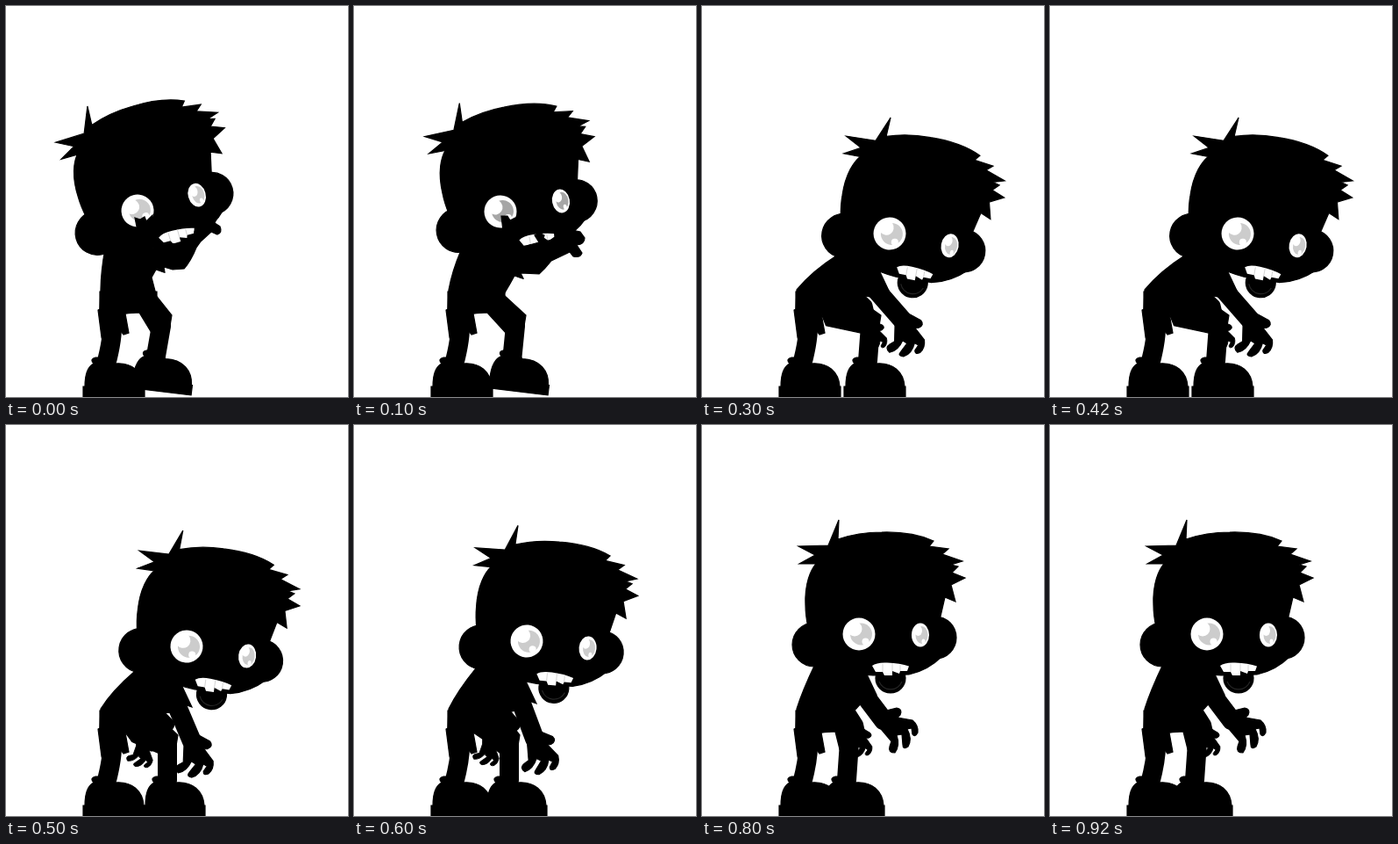
These frames come from a looping animation (390 px wide and 445 px high, 1000 ms). An HTML page:

```html
<!DOCTYPE html>
<html lang="en">
<head>
<meta charset="utf-8">
<title>Shuffling zombie</title>
<style>
  html, body { margin: 0; width: 100%; height: 100%; overflow: hidden; background: #fff; }
  svg { display: block; width: 390px; height: 445px; stroke: #000; stroke-width: 1.2; }
  .limb { fill: none; stroke-linecap: round; stroke-linejoin: round; }
</style>
</head>
<body>
<svg viewBox="0 0 390 445">
  <defs>
    <path id="shoe" d="M0 11.500V0H2C2-16 6-23 12-26Q7-31 14-33H30L36-26C56-28 68-16 69 0H70V11.500Z"/>
    <path id="hand" d="M-8-8L3-11L15-14Q22-13 19-6L16-3L33 0Q40 6 39 14Q36 20 33 16L32 9L27 10Q33 21 28 30Q22 34 22 28L21 16L15 17Q19 29 13 37Q5 37 7 30L9 24L-3 10Z"/>
  </defs>

  <path id="backArm" class="limb" stroke-width="16"/>
  <use id="backHand" href="#hand"/>

  <path d="M107 325V345L105 346L109 377L114 369L131 370L134 374L140 372L136 350L172 345V325Z"/>
  <path class="limb" stroke-width="22" stroke-linecap="butt" d="M121 360Q122 378 114 408"/>
  <use href="#shoe" x="88" y="433"/>
  <path id="shin" class="limb" stroke-width="22"/>
  <path id="thigh"/>
  <use id="foot" href="#shoe"/>
  <path id="torso"/>

  <path id="frontArm" class="limb" stroke-width="22"/>
  <use id="frontHand" href="#hand"/>

  <g id="head">
    <circle cx="128" cy="250" r="25"/>
    <circle cx="266" cy="242" r="24"/>
    <circle cx="215" cy="288" r="17"/>
    <path d="M202 292A14 14 0 0 0 228 292" fill="none" stroke="#262626"/>
    <path d="M118 205C117 180 124 165 130 158L111 158L129 148L110 138L144 137L156 108L155 130Q178 122 205 122Q240 121 264 132L259 138L281 141L274 147L297 155L284 159L292 161L285 168L300 174L284 182L289 201L277 196L271 222L274 263Q258 279 236 284L195 285Q152 282 130 262Q118 228 118 205Z"/>
    <g stroke="none" fill="#fff">
      <path d="M194 274Q199 270 211 270.500Q226 271 236 274.500L234 280L226 280L225 283L217 280V285L208 285L206 281L198 281Z"/>
      <path d="M206 272V281M217 271V280M226 273V280" stroke="#ccc" stroke-width=".8"/>
      <circle cx="179" cy="238" r="18.500"/>
      <circle class="iris" cx="181.500" cy="238" r="12.500"/>
      <circle cx="174" cy="232" r="8.500"/>
      <circle cx="186.500" cy="246.500" r="4"/>
      <ellipse cx="249" cy="239" rx="10" ry="13.500"/>
      <ellipse class="iris" cx="250.500" cy="239" rx="7" ry="10"/>
      <ellipse cx="246.500" cy="234" rx="4.500" ry="6"/>
      <ellipse cx="252.500" cy="246.500" rx="2" ry="3"/>
    </g>
  </g>
  <path id="reach"/>
</svg>
<script>
const $ = id => document.getElementById(id);
const irises = document.querySelectorAll('.iris');

// Arms held up in front of the face
const reachHigh = 'M160 280L172 299L181 303L180 297L190 300L203 299Q211 290 217 275L222 268L234 257L241 260Q247 258 244 251L238 247L243 235L225 240L215 257L213 266L198 271L180 270Z' +
  'M147 241L153 243L158 240L160 245L167 238L168 256L150 256Z';
const reachLow = 'M165 280L176 304L193 310L190 304L211 305Q218 299 225 290L246 280L250 285Q258 287 260 281L254 272Q263 271 263 264L258 257L249 255L257 247L228 250L229 263L222 268L216 264L217 261L211 258L206 261L211 269L200 272L192 276Z' +
  'M168 239L175 239L178 244L184 241V256H170Z';

// head: eye x, y, tilt; neck, sleeve, knee: x, y; foot: x, y, tilt; hands: x, y, tilt
const poses = [
  { at: 0, head: [150, 233, -15.6], neck: [113, 276], sleeve: [180, 303], knee: [177, 368], foot: [143, 423, 7], reach: reachHigh },
  { at: 100, head: [167, 234, -10.7], neck: [122, 278], sleeve: [192, 310], knee: [184, 368], foot: [153, 423, 7], reach: reachLow, iris: '#a6a6a6' },
  { at: 300, head: [214, 259, 10.5], neck: [155, 283], sleeve: [214, 326], knee: [192, 368], foot: [162, 433, 0], front: [229, 358, 42], back: [192, 365, 35] },
  { at: 500, head: [206, 252, 8.2], neck: [146, 281], sleeve: [212, 321], knee: [184, 369], foot: [157, 433, 0], front: [212, 360, 43], back: [156, 362, 60] },
  { at: 600, head: [197, 246, 5.7], neck: [139, 277], sleeve: [208, 317], knee: [177, 369], foot: [150, 433, 0], front: [206, 357, 36], back: [154, 360, 60] },
  { at: 700, head: [188, 241, 3.2], neck: [134, 274], sleeve: [203, 312], knee: [172, 368], foot: [144, 433, 0], front: [210, 348, 26], back: [164, 358, 60] },
  { at: 800, head: [179, 238, 0], neck: [129, 272], sleeve: [199, 307], knee: [168, 365], foot: [138, 433, 0], front: [207, 336, 0], back: [178, 350, 45] }
];

const path = (id, d) => $(id).setAttribute('d', d);
const show = (id, on) => $(id).style.display = on ? '' : 'none';

function place(id, [x, y, turn], scale = 1) {
  $(id).setAttribute('transform', `translate(${x} ${y}) rotate(${turn}) scale(${scale})`);
}

function pose(p) {
  const [nx, ny] = p.neck, [sx, sy] = p.sleeve, [kx, ky] = p.knee;
  const [ex, ey, tilt] = p.head;
  const lean = Math.max(tilt, 0);
  $('head').setAttribute('transform', `translate(${ex - 179} ${ey - 238}) rotate(${tilt} 179 238)`);
  irises.forEach(e => e.setAttribute('fill', p.iris || '#ccc'));

  path('torso', `M107 345L108 323Q${nx * .4 + 63} 302 ${nx} ${ny}L${nx + 15} ${ny - 18}L${sx - 18} ${sy - 38}L${sx} ${sy}L${sx - 9} ${sy - 3}L${sx - 14} ${sy + 6}L171 328L173 345Z`);
  path('thigh', `M136 350L${152 - lean} ${349 + lean * 1.4}L${kx - 11} ${ky + 4}L${kx - 5} ${ky}L${kx + 9} ${ky + 2}L${kx + 12} ${ky - 16}L170 328L130 330Z`);
  path('shin', `M${kx} ${ky - 4}L${p.foot[0] + 27} 404`);
  place('foot', p.foot);

  const hanging = !!p.front;
  ['frontArm', 'frontHand', 'backArm', 'backHand'].forEach(id => show(id, hanging));
  show('reach', !hanging);
  if (hanging) {
    path('frontArm', `M${sx - 20} ${sy - 8}L${p.front[0]} ${p.front[1]}`);
    path('backArm', `M160 316L${176 + lean} 341L${p.back[0]} ${p.back[1]}`);
    place('frontHand', p.front);
    place('backHand', p.back, .68);
  } else {
    path('reach', p.reach);
  }
}

const start = performance.now();
let current;
function tick() {
  const t = (performance.now() - start) % 1000;
  const next = poses.findLast(p => p.at <= t);
  if (next !== current) pose(current = next);
  requestAnimationFrame(tick);
}
tick();
</script>
</body>
</html>
```
